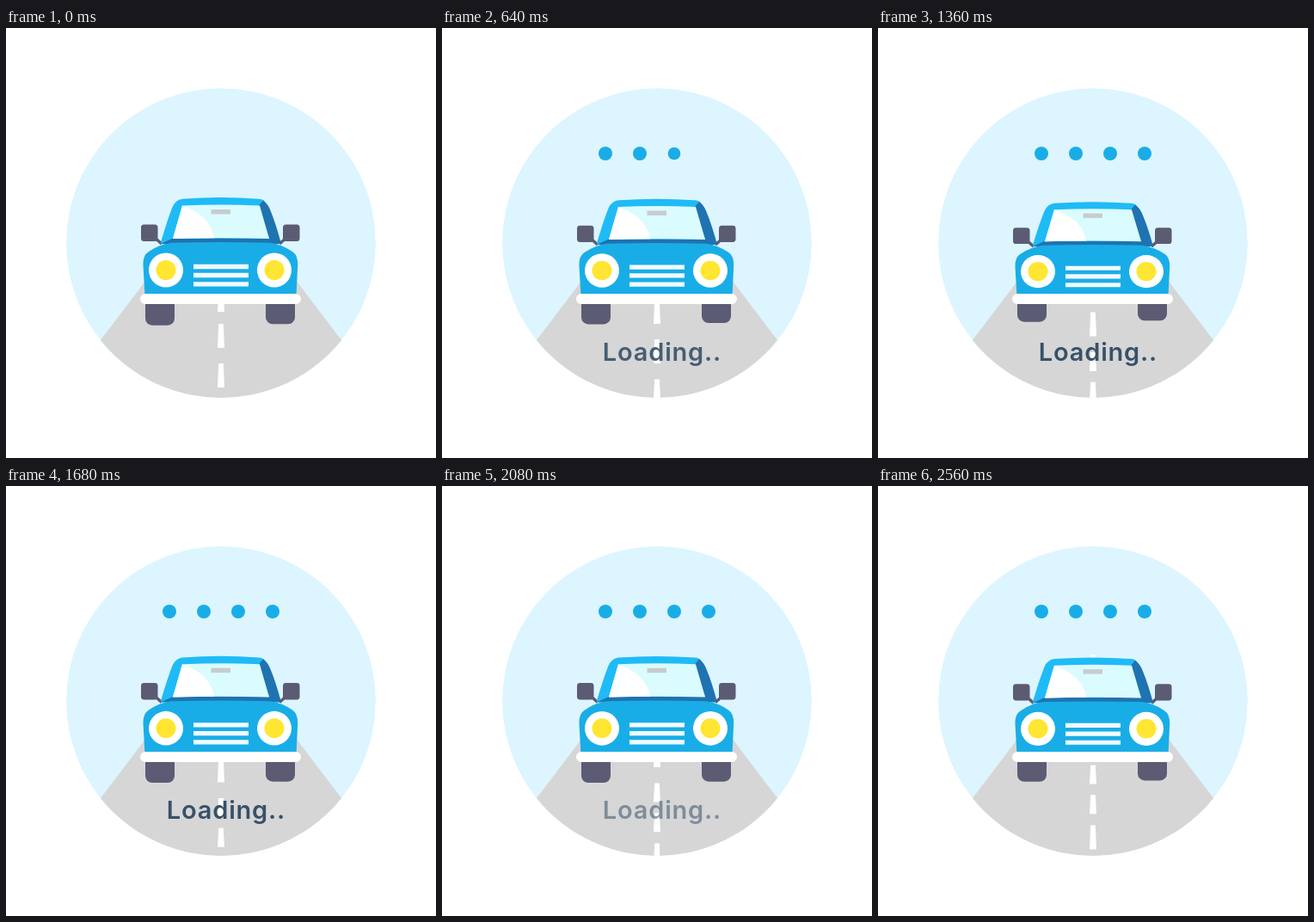
Animation, 500 px wide and 500 px high, one loop 2.64 s. Source, as an HTML page:

```html
<!DOCTYPE html>
<html lang="en">
<head>
<meta charset="utf-8">
<title>Loading</title>
<style>
  html, body { margin: 0; width: 100%; height: 100%; overflow: hidden; background: #fff; }
  svg { display: block; width: 100%; height: 100%; }
  text { font: 600 29px Inter, Roboto, sans-serif; letter-spacing: .8px; }
</style>
</head>
<body>
<svg viewBox="0 0 500 500">
  <defs>
    <clipPath id="disc"><circle cx="250" cy="250" r="180"/></clipPath>
    <path id="long" d="M247.2 0h5.6l1.2 28h-8z"/>
    <path id="short" d="M247.2 0h5.6l1.2 22h-8z"/>
    <g id="lamp">
      <circle r="20" fill="#fff"/>
      <circle r="11.5" fill="#ffe632"/>
    </g>
  </defs>

  <g clip-path="url(#disc)">
    <circle cx="250" cy="250" r="180" fill="#ddf5fe"/>
    <path d="M110 363L168 286.500H332L390 363V440H110z" fill="#d6d6d6"/>
    <g id="lane" fill="#fff">
      <use href="#short" y="308"/>
      <use href="#long" y="344"/>
      <use href="#long" y="390"/>
      <use href="#short" y="436.500"/>
      <use href="#short" y="471.200"/>
      <use href="#long" y="506.500"/>
    </g>
  </g>

  <g id="dots" fill="#19ade7">
    <circle cx="190" cy="146"/>
    <circle cx="230" cy="146"/>
    <circle cx="270" cy="146"/>
    <circle cx="310" cy="146"/>
  </g>

  <g id="wheels" fill="#5c5b74">
    <rect x="162" y="300" width="34" height="45.700" rx="8"/>
    <rect x="302" y="300" width="34" height="44.300" rx="8"/>
  </g>

  <g id="body">
    <path d="M172 243L181 251M327 243L318 251" stroke="#5c5b74" stroke-width="3.500"/>
    <g fill="#5c5b74">
      <rect x="157" y="228.500" width="19.500" height="19.500" rx="3.500"/>
      <rect x="322" y="228.500" width="19.500" height="19.500" rx="3.500"/>
    </g>
    <path d="M179.500 251Q187 225 193.500 208Q197 200 205 198.700Q250 195.500 294 198.700Q299 199 301 202L306 246L194 246z" fill="#1fbbf6"/>
    <path d="M294 206.500L299 200.500Q304 204 307 211Q314 228 320 251H179.500L194 244.500H306z" fill="#1f73b0"/>
    <path d="M205 206.500Q250 204.500 295 206.500L306 245Q250 243.500 194 245z" fill="#dafcff"/>
    <path d="M205 206.500Q238 218 242 244.200Q215 244.200 194 245z" fill="#fff"/>
    <rect x="238.500" y="211" width="22.500" height="5.500" fill="#c8cccf"/>
    <path d="M161.500 312L159.500 276Q159 264 166 260Q178 251.500 192 249.700Q250 248.500 307 249.700Q321 251.500 333 260Q339.500 264 339.200 276L337.500 312z" fill="#19ade7"/>
    <use href="#lamp" x="186" y="281.500"/>
    <use href="#lamp" x="312" y="281.500"/>
    <path d="M218 277.500h64M218 287.500h64M218 297.800h64" stroke="#f1fbff" stroke-width="5.300"/>
  </g>
  <rect x="156" y="309" width="187" height="12" rx="6" fill="#fff"/>

  <text id="label" x="256" y="386.500" text-anchor="middle" fill="#385069">Loading..</text>
</svg>
<script>
  const LOOP = 2640, STEP = 80, BOUNCE = 537.5;
  const $ = id => document.getElementById(id);
  const [lane, wheels, body, label] = ['lane', 'wheels', 'body', 'label'].map($);
  const dots = [...$('dots').children];
  const ramp = (t, start, length) => Math.min(1, Math.max(0, (t - start) / length));
  const smooth = p => p * p * (3 - 2 * p);

  function draw(t) {
    lane.setAttribute('transform', `translate(0 ${-t * 0.04375})`);

    // The cabin sinks towards the bumper while the wheels rise.
    const sink = 2.6 * (1 - Math.cos(2 * Math.PI * t / BOUNCE));
    body.setAttribute('transform', `translate(0 321) scale(1 ${1 - sink / 124}) translate(0 -321)`);
    wheels.setAttribute('transform', `translate(0 ${-0.78 * sink})`);

    dots.forEach((dot, i) => dot.setAttribute('r', 8 * smooth(ramp(t, 32 + 210 * i, 230))));
    label.setAttribute('opacity', ramp(t, 145, 550) * (1 - ramp(t, 1830, 550)));
  }

  const start = performance.now();
  function tick() {
    const t = (performance.now() - start + 0.5) % LOOP;
    draw(Math.floor(t / STEP) * STEP);
    requestAnimationFrame(tick);
  }
  tick();
</script>
</body>
</html>
```
